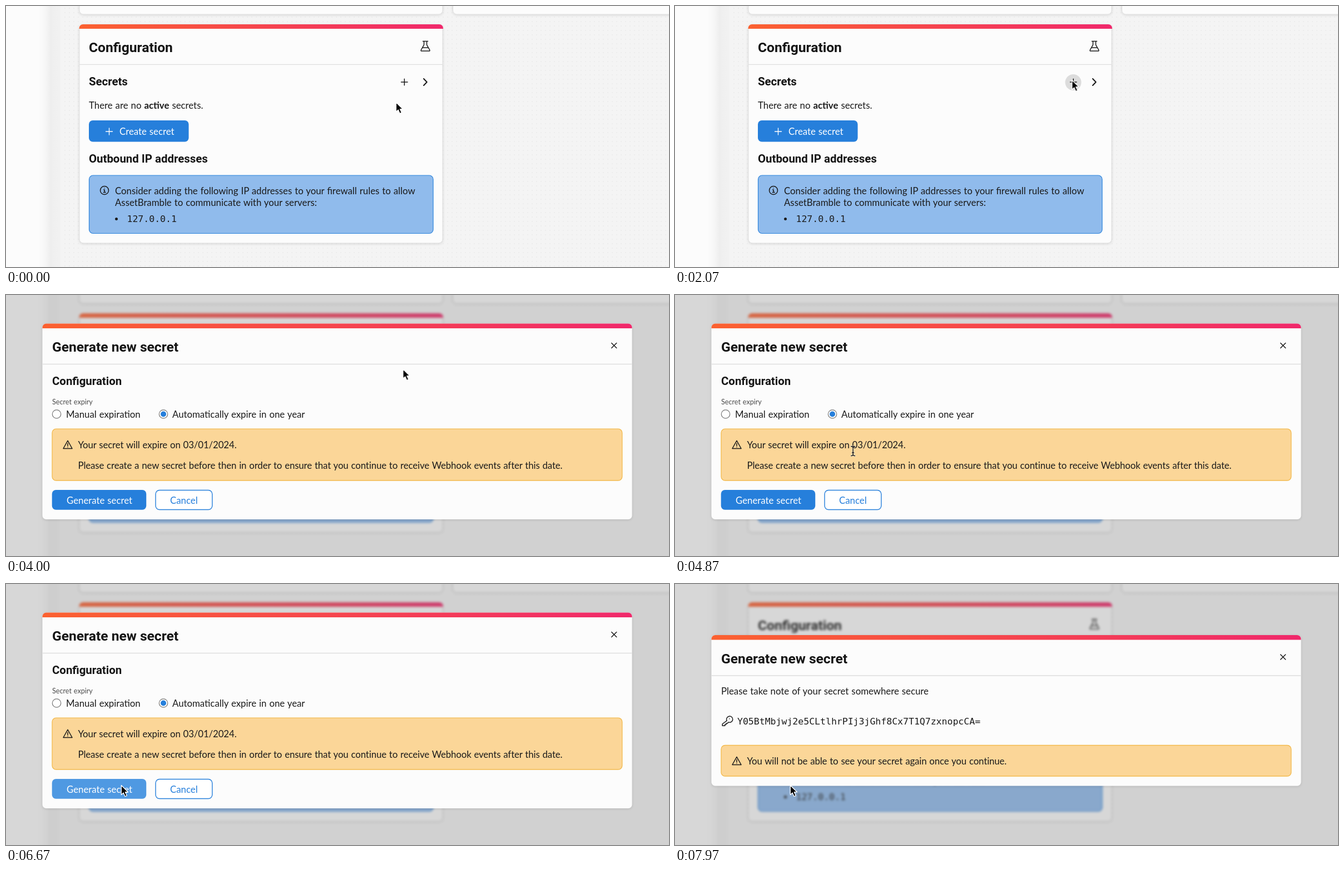
An HTML page that plays this animation: 1192x470 px, repeating every 8 s.

```html
<!DOCTYPE html>
<html lang="en">
<head>
<meta charset="utf-8">
<title>Generate new secret</title>
<style>
html, body { margin: 0; width: 100%; height: 100%; overflow: hidden; background: #f4f4f4; }
svg { display: block; width: 1192px; height: 470px; }
text { font: 16.8px Lato, "Open Sans", sans-serif; word-spacing: .7px; fill: #1b1b1b; white-space: pre; }
.h1, .h2 { font: 700 24.6px Roboto, sans-serif; word-spacing: 0; fill: #141414; }
.h2 { font-size: 20.4px; }
.small { font-size: 12.6px; fill: #4c4c4c; }
.note { letter-spacing: -.1px; }
.mono { font: 16.5px "DejaVu Sans Mono", monospace; word-spacing: 0; }
.light { fill: #fff; }
.link { fill: #267fdb; }
.b { font-weight: 700; }
.card { fill: #fcfcfc; stroke: #dcdcdc; }
.line { fill: none; stroke: #1a1a1a; stroke-width: 1.5; stroke-linecap: round; stroke-linejoin: round; }
.rule { stroke: #dedede; stroke-width: 1.3; }
.warn { fill: #fbd698; stroke: #f3ba4e; stroke-width: 1.3; }
.blue { fill: #267fdb; }

/* one shared 8 s clock */
.t { animation: 8s linear infinite both; }
.step { animation-timing-function: step-end; }
#page { animation-name: blur; }
#shade { animation-name: shade; }
#form { animation-name: form; }
#done { animation-name: done; }
#plusHover { animation-name: plusHover; }
#primary { animation-name: primary; }
#actions { animation-name: actions; }
#cursor { animation-name: move; }
#arrow { animation-name: arrow; }
#hand { animation-name: hand; }
#beam { animation-name: beam; }

@keyframes blur { 0% { filter: none } 32.875%, 100% { filter: blur(2px) } }
@keyframes shade { 0% { opacity: 0 } 32.875%, 100% { opacity: 1 } }
@keyframes form { 0% { opacity: 0 } 32.875% { opacity: 1 } 99.625%, 100% { opacity: 0 } }
@keyframes done { 0% { opacity: 0 } 99.625%, 100% { opacity: 1 } }
@keyframes plusHover { 0%, 2.5% { opacity: 0 } 4.4%, 100% { opacity: 1 } }
@keyframes primary {
  0%, 63.5% { fill: #267fdb }
  65.4%, 85.375% { fill: #4f99e2 }
  87.5%, 100% { fill: #267fdb }
}
@keyframes actions { 0%, 85.375% { opacity: 1 } 87.5%, 100% { opacity: .4 } }
@keyframes move {
  0% { transform: translate(701px, 173px) }
  .375% { transform: translate(701px, 173px); animation-timing-function: cubic-bezier(.3, .4, .4, 1) }
  7.5% { transform: translate(713.5px, 133px) }
  58.375% { transform: translate(713.5px, 133px); animation-timing-function: cubic-bezier(.4, 0, .7, .7) }
  60.875% { transform: translate(321.5px, 280px); animation-timing-function: cubic-bezier(.1, .6, .4, 1) }
  66.625%, 100% { transform: translate(207px, 362px) }
}
@keyframes arrow {
  0% { opacity: 1 } 2.5% { opacity: 0 } 25.875% { opacity: 1 } 60.5% { opacity: 0 }
  61.625% { opacity: 1 } 63.5% { opacity: 0 } 83.375%, 100% { opacity: 1 }
}
@keyframes hand {
  0% { opacity: 0 } 2.5% { opacity: 1 } 25.875% { opacity: 0 }
  63.5% { opacity: 1 } 83.375%, 100% { opacity: 0 }
}
@keyframes beam { 0% { opacity: 0 } 60.5% { opacity: 1 } 61.625%, 100% { opacity: 0 } }
</style>
</head>
<body>
<svg viewBox="0 0 1192 470">
  <defs>
    <linearGradient id="hot"><stop stop-color="#fb6130"/><stop offset="1" stop-color="#f0286b"/></linearGradient>
    <linearGradient id="edge">
      <stop stop-color="#fcfcfc"/><stop offset=".3" stop-color="#f7f7f7"/>
      <stop offset=".55" stop-color="#eeeeee"/><stop offset="1" stop-color="#f2f2f2"/>
    </linearGradient>
    <pattern id="dots" width="8" height="8" patternUnits="userSpaceOnUse"><circle cx="2" cy="4" r=".8" fill="#e4e4e4"/></pattern>
    <filter id="soft" x="-5%" y="-10%" width="110%" height="120%"><feDropShadow dx="0" dy="1" stdDeviation="2" flood-opacity=".13"/></filter>
    <g id="warning" class="line">
      <path d="M0-7.2 8 7H-8Z"/><path d="M0-2.3V2.2M0 4.5v.1"/>
    </g>
    <g id="head">
      <path d="M65.500 60V58.500a7 7 0 0 1 7-7H1118.500a7 7 0 0 1 7 7V60Z" fill="url(#hot)"/>
      <text class="h1" x="83" y="102">Generate new secret</text>
      <path class="line" d="M1088.700 86.500l9 9m0-9-9 9"/>
      <path class="rule" d="M66 124.500H1125"/>
    </g>
    <path id="bar" d="M-3.500-8.500Q0-8.500 0-6Q0-8.500 3.500-8.500M0-6.500V6.500M-3.500 8.500Q0 8.500 0 6Q0 8.500 3.500 8.500M-1.700 2.800H1.700"/>
  </defs>

  <g id="page" class="t step">
    <rect x="-20" y="-20" width="1232" height="510" fill="#f4f4f4"/>
    <rect x="100" y="-20" width="1112" height="510" fill="url(#dots)"/>
    <rect x="-20" y="-20" width="80" height="510" fill="#fcfcfc"/>
    <rect x="58" y="-20" width="40" height="510" fill="url(#edge)"/>
    <g filter="url(#soft)">
      <rect class="card" x="132" y="-30" width="653" height="45" rx="7"/>
      <rect class="card" x="803.500" y="-30" width="653" height="45" rx="7"/>
      <rect class="card" x="132" y="33.500" width="653" height="393.500" rx="7"/>
    </g>
    <path d="M131.500 41V40a7 7 0 0 1 7-7H779a7 7 0 0 1 7 7V41Z" fill="url(#hot)"/>
    <text class="h1" x="149" y="83">Configuration</text>
    <path class="line" d="M749.500 63.500h9M751.500 63.500v6.300l-5.200 9.400q-.8 1.800 1 1.800h13.400q1.800 0 1-1.800l-5.200-9.400v-6.300M749 75h10"/>
    <path class="rule" d="M132 105.300H785"/>

    <text class="h2" x="149" y="143">Secrets</text>
    <circle id="plusHover" class="t" cx="716" cy="137.500" r="14.500" fill="#dcdcdc"/>
    <path class="line" d="M710.500 137h11.500m-5.750-5.750v11.500"/>
    <path class="line" style="stroke-width:2" d="M751 131l5.700 6-5.700 6"/>
    <text x="149" y="185">There are no <tspan class="b">active</tspan> secrets.</text>
    <rect class="blue" x="149" y="206" width="179.500" height="38.500" rx="7"/>
    <path class="line" style="stroke:#fff;stroke-width:1.3" d="M179.500 226h12m-6-6v12"/>
    <text class="light" x="204" y="232">Create secret</text>

    <text class="h2" x="149" y="282">Outbound IP addresses</text>
    <rect x="149.500" y="305" width="618.500" height="104.500" rx="7" fill="#90bbec" stroke="#2c83dc" stroke-width="1.200"/>
    <g class="line"><circle cx="177" cy="332" r="7.500"/><path d="M175.500 331h1.700v4.500m-2 0h4M176.900 328v.1"/></g>
    <text x="196" y="339">Consider adding the following IP addresses to your firewall rules to allow</text>
    <text x="196" y="359.500">AssetBramble to communicate with your servers:</text>
    <circle cx="198.500" cy="383.500" r="2.500" fill="#1b1b1b"/>
    <text class="mono" x="217.500" y="388.500">127.0.0.1</text>
  </g>

  <rect id="shade" class="t step" width="1192" height="470" fill="#787878" fill-opacity=".28"/>

  <g id="form" class="t step">
    <rect x="65.500" y="51.500" width="1060" height="352.500" rx="7" fill="#fcfcfc" filter="url(#soft)"/>
    <use href="#head"/>
    <text class="h2" x="83" y="162">Configuration</text>
    <text class="small" x="83" y="197">Secret expiry</text>
    <g fill="#fff" stroke="#777" stroke-width="1.200">
      <circle cx="91" cy="214.500" r="7.700"/>
      <circle cx="283" cy="214.500" r="7.700"/>
    </g>
    <circle class="blue" cx="283" cy="214.500" r="5"/>
    <text x="108" y="220.500">Manual expiration</text>
    <text x="299" y="220.500">Automatically expire in one year</text>
    <rect class="warn" x="83" y="241.200" width="1024.800" height="92.800" rx="7"/>
    <use href="#warning" x="111" y="269.500"/>
    <text class="note" x="129.500" y="275.500">Your secret will expire on 03/01/2024.</text>
    <text class="note" x="129.500" y="313">Please create a new secret before then in order to ensure that you continue to receive Webhook events after this date.</text>
    <g id="actions" class="t">
      <rect id="primary" class="t" x="82.700" y="351" width="169.500" height="35.800" rx="7"/>
      <text class="light" x="109" y="375.500">Generate secret</text>
      <rect x="269" y="351.500" width="101.800" height="35" rx="7" fill="#fff" stroke="#267fdb" stroke-width="1.400"/>
      <text class="link" x="295" y="375.500">Cancel</text>
    </g>
  </g>

  <g id="done" class="t step">
    <rect x="65.500" y="92" width="1060" height="271.500" rx="7" fill="#fcfcfc" filter="url(#soft)"/>
    <use href="#head" y="40.500"/>
    <text x="83" y="199">Please take note of your secret somewhere secure</text>
    <g class="line">
      <path d="M93.200 246.200a5.600 5.600 0 1 1 3 2.700l-2 2h-2.200v2.200h-2.200v2.200h-4.600v-3.300Z"/>
      <path d="M97.800 242.800h.1"/>
    </g>
    <text class="mono" x="112" y="252.500">Y05BtMbjwj2e5CLtlhrPIj3jGhf8Cx7T1Q7zxnopcCA=</text>
    <rect class="warn" x="83" y="290.500" width="1024.800" height="55.500" rx="7"/>
    <use href="#warning" x="111" y="318.500"/>
    <text class="note" x="129.500" y="324.500">You will not be able to see your secret again once you continue.</text>
  </g>

  <g id="cursor" class="t" stroke-linejoin="round">
    <path id="arrow" class="t step" d="M.3.500V17.500L4.200 14 7 20.500 10.200 19.100 7.400 12.700H12.600Z" fill="#000" stroke="#fff" stroke-width="1.300"/>
    <g id="hand" class="t step" fill="#fff" stroke="#000" stroke-width="1.200">
      <path d="M.4 15-2.600 11.700c-2-2.300.4-4 2.200-2.300l1.500 1.300L0 5.300c-.5-2.400 2.300-3 2.900-.8l1 4.200c.3-1.700 2.700-1.700 3 .2 .6-1.500 2.900-1.300 3.200.5 .8-1.200 3-.6 3.100 1.200 .2 3.200-.2 5.600-1.500 8V22H2.700V19.700Q1.600 16.700.4 15Z"/>
      <path d="M5 14.300v4M7.400 14.300v4M9.800 14.300v4" stroke-width="1"/>
    </g>
    <g id="beam" class="t step" fill="none" stroke-linecap="round">
      <use href="#bar" stroke="#fff" stroke-width="2.800" stroke-opacity=".6"/>
      <use href="#bar" stroke="#000" stroke-width="1.300"/>
    </g>
  </g>
</svg>
</body>
</html>
```
